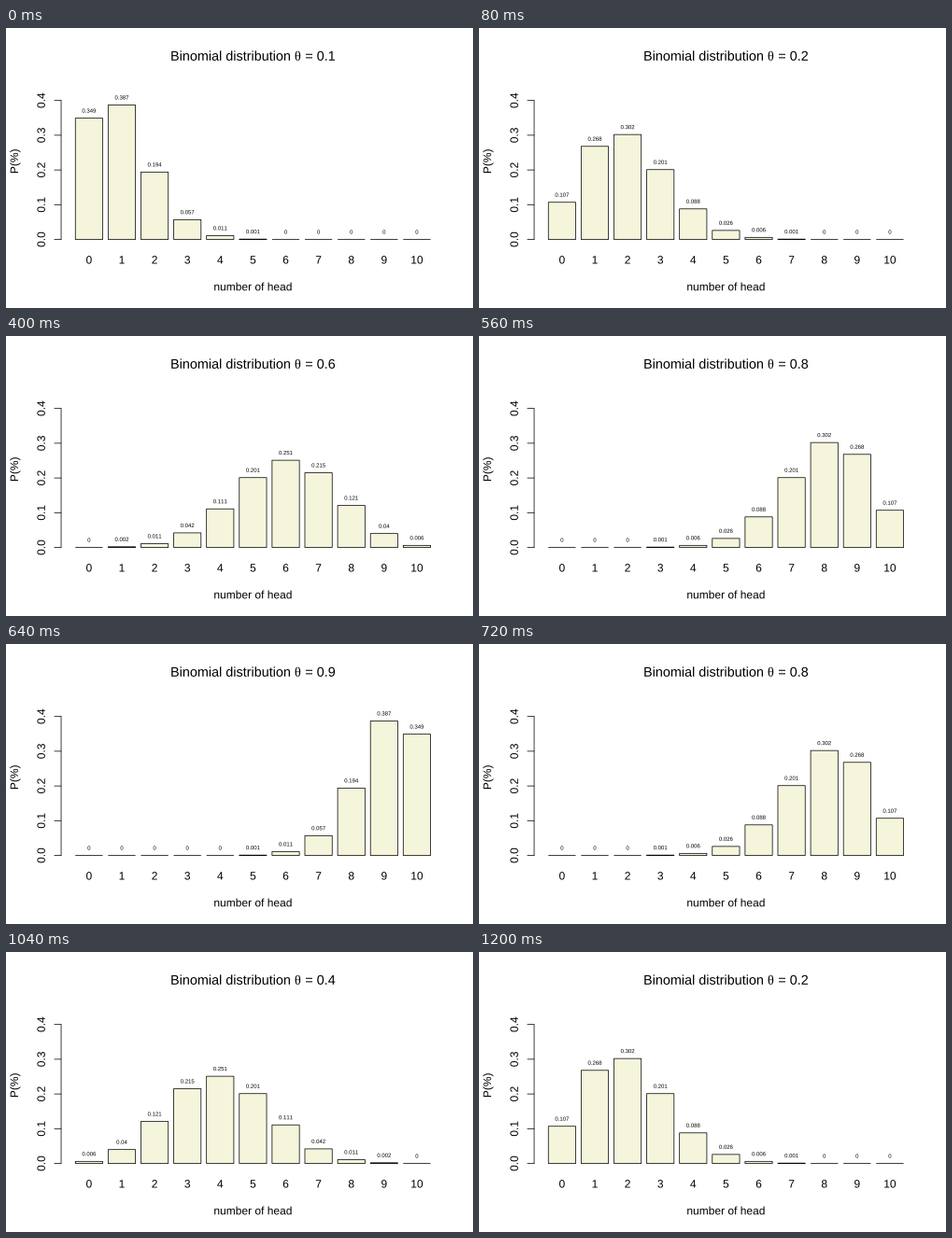
A matplotlib script that plays this animation: 500x300 px, repeating every 1280 ms.

```python
from math import comb

import matplotlib.pyplot as plt
from matplotlib.animation import ArtistAnimation
from matplotlib.patches import PathPatch, Rectangle
from matplotlib.path import Path
from matplotlib.textpath import TextPath
from matplotlib.transforms import Affine2D

W, H, DPI = 500, 300, 100
FRAMES, INTERVAL = 16, 80
TRIALS = 10

# Plot region in pixels, y pointing down
LEFT, RIGHT, TOP, BOTTOM = 59.04, 469.76, 59.04, 226.56
LINE = 14.4
UNIT = (RIGHT - LEFT) / 14.04
SCALE = (BOTTOM - TOP) / 0.45
STROKE = 0.75 * 72 / DPI

SANS, SERIF = "Liberation Sans", "Liberation Serif"

fig = plt.figure(figsize=(W / DPI, H / DPI), dpi=DPI, facecolor="white")
ax = fig.add_axes([0, 0, 1, 1])
ax.set(xlim=(0, W), ylim=(H, 0))
ax.axis("off")


def right_edge(text, size, font):
    return TextPath((0, 0), text, size=size, prop={"family": font}).get_extents().x1


def advance(char, size, font):
    return right_edge(char + "|", size, font) - right_edge("|", size, font)


def draw_text(x, y, text, size=12, font=SANS, angle=0, align=0.5):
    """Draw unkerned text with sub-pixel placement; y is the baseline."""
    glyphs, pen = [], 0
    for char in text:
        if char != " ":
            glyphs.append(TextPath((pen, 0), char, size=size, prop={"family": font}))
        pen += advance(char, size, font)
    place = (Affine2D().translate(-align * pen, 0).rotate_deg(angle)
             .scale(1, -1).translate(x, y))
    path = Path.make_compound_path(*glyphs).transformed(place)
    return ax.add_patch(PathPatch(path, fc="black", lw=0, snap=False))


def draw_line(xs, ys):
    ax.plot(xs, ys, color="black", lw=STROKE, solid_capstyle="round", snap=False)


def bar_left(k):
    return LEFT + (0.52 + 1.2 * k) * UNIT


def draw_axes():
    draw_line([LEFT, LEFT], [BOTTOM, BOTTOM - 0.4 * SCALE])
    for i in range(5):
        y = BOTTOM - i / 10 * SCALE
        draw_line([LEFT, LEFT - LINE / 2], [y, y])
        draw_text(LEFT - 1.2 * LINE, y, f"{i / 10:.1f}", angle=90)
    for k in range(TRIALS + 1):
        draw_text(bar_left(k) + UNIT / 2, BOTTOM + 1.8 * LINE, str(k))
    draw_text((LEFT + RIGHT) / 2, BOTTOM + 3.8 * LINE, "number of head")
    draw_text(LEFT - 3.2 * LINE, (TOP + BOTTOM) / 2, "P(%)", angle=90)

    for x, text, font in [(176.05, "Binomial distribution", SANS),
                          (308.9, "θ", SERIF), (320.3, "=", SANS)]:
        draw_text(x, 34.8, text, LINE, font, align=0)


def draw_distribution(theta):
    artists = [draw_text(332.7, 34.8, f"{theta:.1f}", LINE, align=0)]
    for k in range(TRIALS + 1):
        p = comb(TRIALS, k) * theta**k * (1 - theta)**(TRIALS - k)
        p = round(p, 3)
        x, top = bar_left(k), BOTTOM - p * SCALE
        bar = Rectangle((x, top), UNIT, p * SCALE, fc="beige", ec="black",
                        lw=STROKE, joinstyle="round", snap=False)
        artists.append(ax.add_patch(bar))
        artists.append(draw_text(x + UNIT / 2, top - 6, f"{p:g}", 6))
    return artists


draw_axes()
# Theta climbs from 0.1 to 0.9 and back down
scenes = [draw_distribution((1 + min(i, FRAMES - i)) / 10) for i in range(FRAMES)]
anim = ArtistAnimation(fig, scenes, interval=INTERVAL, repeat=True, repeat_delay=0)
plt.show()
```
